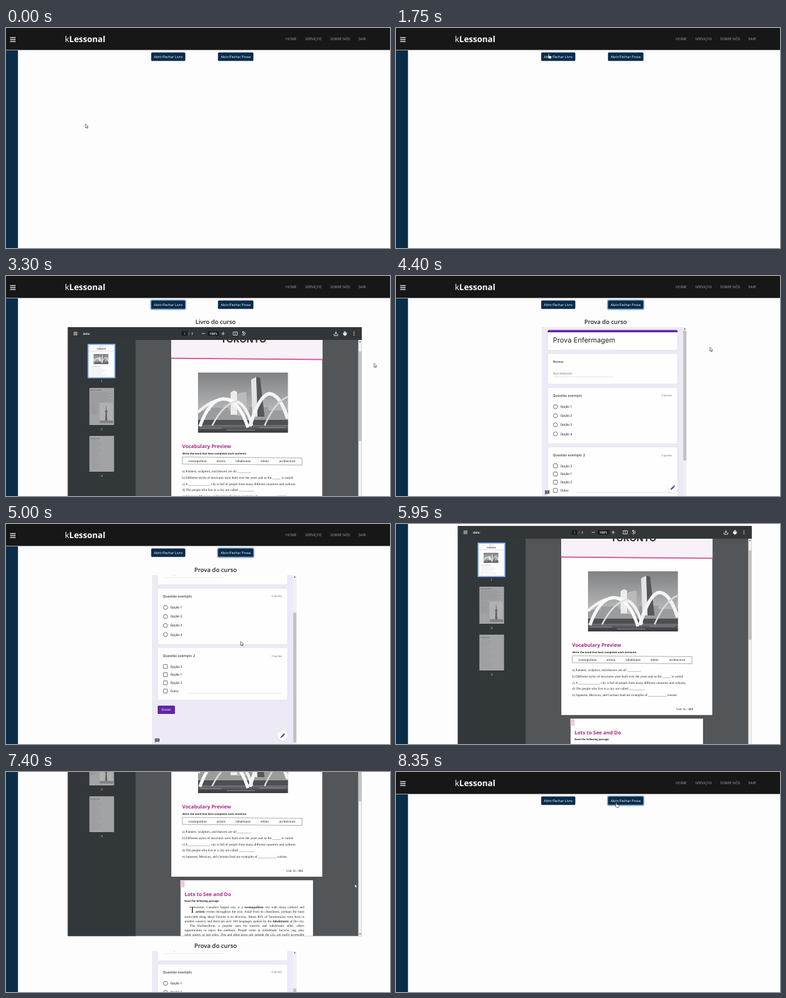
An HTML page that plays this animation: 600 by 344 pixels, repeating every 8400 ms.

```html
<!DOCTYPE html>
<html lang="pt">
<head>
<meta charset="utf-8">
<title>kLessonal</title>
<style>
html, body { margin: 0; width: 100%; height: 100%; overflow: hidden; background: #fdfdfd; }
svg { display: block; }
text { font-family: "Open Sans", "Noto Sans", sans-serif; text-rendering: geometricPrecision; white-space: pre; }
.serif { font-family: "Liberation Serif", "Noto Serif", serif; }
.inter { font-family: Inter, sans-serif; }
.robo { font-family: Roboto, sans-serif; }
</style>
</head>
<body>
<svg id="stage" width="600" height="344" viewBox="0 0 600 344" xmlns="http://www.w3.org/2000/svg"></svg>
<script>
const LOOP = 8400, STEP = 50;
const DARK = '#171717', NAVY = '#0b2c49', PINK = '#a92a80', INK = '#1f1f1f';

const rect = (x, y, w, h, fill, more = '') =>
  `<rect x="${x}" y="${y}" width="${w}" height="${h}" fill="${fill}" ${more}/>`;
const text = (x, y, size, str, fill, more = '') =>
  `<text x="${x}" y="${y}" font-size="${size}" fill="${fill}" ${more}>${str}</text>`;
const path = (d, stroke, width, fill = 'none') =>
  `<path d="${d}" stroke="${stroke}" stroke-width="${width}" fill="${fill}"/>`;
const shape = (d, fill) => `<path d="${d}" fill="${fill}"/>`;
const disc = (x, y, r, fill, more = '') =>
  `<circle cx="${x}" cy="${y}" r="${r}" fill="${fill}" ${more}/>`;
const BOLD = 'font-weight="700"', SEMI = 'font-weight="600"', MID = 'text-anchor="middle"';
const SERIF = 'class="serif"', INTER = 'class="inter"', ROBO = 'class="robo"';
const SHADOW = 'stroke="#000" stroke-opacity=".28" stroke-width="1.2"';

function header() {
  const nav = [[437, 'HOME'], [467.5, 'SERVIÇOS'], [506.5, 'SOBRE NÓS'], [550.5, 'SAIR']];
  return rect(0, 0, 600, 34.4, DARK) +
    path('M6.5 15.2h8.5M6.5 18.2h8.5M6.5 21.2h8.5', '#fff', 1.3) +
    text(92, 22, 13, 'k<tspan font-weight="700">Lessonal</tspan>', '#fff') +
    nav.map(([x, s]) => text(x, 18.8, 5.7, s, '#a3a3a3')).join('');
}

function button(id, x, w, label) {
  return rect(x - .8, 37.4, w + 1.6, 15.2, 'none', `id="${id}" rx="2" stroke="#86b4e0" stroke-width="1.4"`) +
    rect(x, 38.2, w, 13.4, '#0a2b4b', 'rx="1.5"') +
    text(x + w / 2, 46.9, 5.4, label, '#fff', MID);
}

function photo() {
  return rect(300, 74, 140.5, 94, 'url(#sky)') +
    shape('M300 134h20v-5h28v4h32v-5h30v5h30.5v25H300z', '#9a9c9d') +
    shape('M351 105l5-3 5 2v36h-10z', '#ececec') +
    shape('M361 108q9-5 15-3v36h-15z', '#b9babb') +
    shape('M383 85l8-4 3 62h-9z', '#e4e4e4') +
    shape('M391 81l6 1 7 61h-11z', '#55575a') +
    rect(300, 148, 140.5, 8, '#4d5052') +
    rect(300, 156, 140.5, 12, 'url(#water)') +
    path('M303 161h34M345 164h44M396 160h40', '#8f9193', 1) +
    path('M300 136Q334 104 366 122Q378 132 384 157', '#f1f1f1', 4.5) +
    path('M303 158Q318 116 340 115Q364 116 378 160', '#fafafa', 5) +
    path('M322 157Q340 122 362 118', '#dedede', 2.5) +
    path('M381 158Q396 108 412 107Q428 108 440 146', '#f4f4f4', 5.5) +
    path('M404 157Q420 120 440 112', '#d9d9d9', 2.5);
}

function pageOne() {
  const words = [[285, 'cosmopolitan'], [329, 'artistic'], [359, 'inhabitants'], [398, 'ethnic'], [427, 'architecture']];
  const blank = n => '_'.repeat(n);
  const lines = [
    `a) Painters, sculptors, and dancers are all ${blank(8)}.`,
    `b) Different styles of structures were built over the years and so the ${blank(5)} is varied.`,
    `c) A ${blank(13)} city is full of people from many different countries and cultures.`,
    `d) The people who live in a city are called ${blank(9)}.`,
    `e) Japanese, Mexican, and German food are examples of ${blank(11)} cuisine.`];
  return rect(258, -8, 236.5, 307, '#fefefe', SHADOW) +
    shape('M258-8H494.5V53L258 51.5z', '#f8f1f8') +
    text(371, 8, 5, 'UNIT 16', PINK, MID + ' ' + BOLD) +
    text(371, 26.8, 14.3, 'TORONTO', '#2c2c2c', `class="inter" ${MID} ${BOLD}`) +
    path('M258 51.7L494.5 53.7', '#cf4f97', 1.7) +
    photo() +
    text(275.3, 192, 7.8, 'Vocabulary Preview', PINK, BOLD) +
    text(275.5, 202, 3.98, 'Write the word that best completes each sentence.', INK, BOLD) +
    path('M275.5 206L462.5 207.5V218.5L275.5 217z', '#777', .6) +
    words.map(([x, s]) => text(x, 213.6, 5.3, s, INK, SERIF)).join('') +
    lines.map((s, i) => text(275.3, 230 + i * 9.75, 5.2, s, INK, SERIF)).join('') +
    text(438, 291, 4.9, 'Unit 16 / <tspan font-weight="700">153</tspan>', INK, SERIF);
}

function pageTwo() {
  const b = s => `<tspan font-weight="700">${s}</tspan>`;
  const lines = [
    [296, `oronto, Canada’s largest city, is a ${b('cosmopolitan')} city with many cultural and`],
    [296, `${b('artistic')} events throughout the year. Aside from its cleanliness, perhaps the most`],
    [279, 'noticeable thing about Toronto is its diversity. About 40% of Torontonians were born in'],
    [279, `another country, and there are over 100 languages spoken by the ${b('inhabitants')} of the city.`],
    [287, 'The Harbourfront, a popular area for tourists and inhabitants alike, offers'],
    [279, 'opportunities to enjoy the outdoors. People come to rollerblade, bicycle, jog, play'],
    [279, 'other sports, or just relax. This and other areas just outside the city, are easily accessible']];
  return rect(272.5, 304, 207.5, 268, '#fefefe', SHADOW) +
    rect(272.5, 304, 6.5, 11.5, '#f2c8de') +
    text(279, 328.6, 7.9, 'Lots to See and Do', PINK, BOLD) +
    text(279, 338, 3.95, 'Read the following passage.', INK, BOLD) +
    text(287, 354.5, 14, 'T', INK, SERIF) +
    lines.map(([x, s], i) => text(x, 348.2 + i * 7.2, 5.2, s, INK, `class="serif" data-end="466"`)).join('');
}

function thumbs() {
  const rows = (x, y, w, n, gap) => Array.from({ length: n }, (_, i) =>
    `M${x} ${y + i * gap}h${w * (.72 + .28 * Math.sin(i * 2.3) ** 2)}`).join('');
  const label = (y, n) => text(149.5, y, 4.6, n, '#f1f1f1', MID);
  return rect(128.4, 30, 41.6, 52, '#fefefe', 'stroke="#8ab4f8" stroke-width="1.8"') +
    text(149, 34, 2, 'UNIT 16', PINK, MID) +
    text(149, 37.6, 2.9, 'TORONTO', '#333', MID + ' ' + BOLD) +
    path('M129.5 40.3h39.5', '#e5a3c6', .5) +
    `<g transform="translate(136.8 45) scale(.165) translate(-300 -74)">${photo()}</g>` +
    text(133, 65, 1.6, 'Vocabulary Preview', '#b86a9d', BOLD) +
    path(rows(133, 67, 24, 7, 1.9), '#cfcfcf', .4) + label(88.8, 1) +
    rect(130.3, 98, 38.5, 58, '#a2a3a4') +
    text(132, 102.3, 1.9, 'Lots to See and Do', '#6b3459', BOLD) +
    path(rows(132, 104.5, 35, 12, 1.35), '#8e8f90', .5) +
    path(rows(132, 121.5, 13, 14, 1.35), '#8e8f90', .5) +
    rect(146.5, 121.5, 20.5, 31.5, '#b0b1b2') +
    shape('M156.6 124l1 12 .8 13h-3.6l.8-13z', '#606365') +
    rect(154.4, 134, 4.4, 1.8, '#606365') + rect(146.5, 149, 20.5, 4, '#7f8183') + label(163.8, 2) +
    rect(130.3, 173, 38.5, 56, '#a2a3a4') +
    text(132, 177.5, 2, 'Reading Check', '#555', BOLD) +
    path(rows(133, 180, 17, 16, 2.9), '#8a8b8d', .45) + label(236.8, 3);
}

function toolbar() {
  const w = '#f1f1f1';
  return rect(96, 3, 460, 20, '#323639') +
    path('M105.5 11h6M105.5 13h6M105.5 15h6', w, .9) +
    text(120.3, 14.8, 4.7, 'data:', w, `class="inter" ${BOLD}`) +
    rect(274.5, 9.5, 8.5, 7, '#191b1c') + text(279, 14.9, 5, '1', w, `class="robo" ${MID}`) +
    text(285, 14.9, 5, '/  3', w, ROBO) +
    path('M305.8 13h5M336.8 13h5M339.3 10.5v5', w, .8) +
    rect(315.5, 9.5, 17, 7, '#191b1c') + text(324, 14.9, 5, '100%', w, `class="robo" ${MID} ${SEMI}`) +
    path('M355 10.5h6.5v5H355zM358.2 11.5v3', w, .8) +
    path('M369.6 10.8a2.7 2.7 0 1 1-.9 3.4M371 9.2l-2 1.7 2 1.6M371 12l1.3 1-1.3 1z', w, .8) +
    path('M515.5 9.5v4M513.7 12l1.8 1.8L517.3 12M512.6 13.5v2.6h5.8v-2.6', w, .9) +
    rect(526.8, 11.6, 5.6, 3.4, w) + rect(528, 9.8, 3.2, 1.3, w) + rect(528, 14, 3.2, 2.3, w) +
    [10.6, 13, 15.4].map(y => disc(543.7, y, .75, w)).join('');
}

const arrow = (x, y, dir) => shape(`M${x - 1.5} ${y + dir}h3l-1.5 ${-2 * dir}z`, '#555');

function book() {
  return text(327.5, -1.6, 9.3, 'Livro do curso', '#222', `${MID} ${SEMI}`) +
    `<svg x="96.6" y="3" width="459.2" height="388.5" viewBox="96.6 3 459.2 388.5">` +
    rect(96, 3, 460, 389, '#525659') +
    `<g id="doc">${pageOne()}${pageTwo()}</g>` +
    rect(96, 23, 106.5, 369, '#32373a') + thumbs() +
    rect(550.5, 23, 5.5, 369, '#f1f1f1') + arrow(553.2, 25.5, 1) + arrow(553.2, 388.5, -1) +
    rect(550.8, 28, 4.9, 140, '#c1c1c1', 'id="docThumb"') + toolbar() + '</svg>';
}

function form() {
  const ink = '#202124', grey = '#777b80';
  const card = (y, h) => rect(237, y, 203, h, '#fefefe', 'rx="2" stroke="#dcd8e6" stroke-width=".6"');
  const question = (y, s) => text(245.3, y + 2, 5.5, s, ink, INTER) +
    text(431.5, y + 1.5, 4.15, '0 pontos', grey, 'class="robo" text-anchor="end"');
  const option = (y, s, box) => (box
    ? rect(246, y - 3.1, 6.2, 6.2, 'none', 'rx=".7" stroke="#5f6368" stroke-width=".9"')
    : disc(249.2, y, 3.2, 'none', 'stroke="#5f6368" stroke-width=".9"')) +
    text(256.7, y + 1.7, 5, s, ink, ROBO);
  return text(327.5, 75.4, 9.3, 'Prova do curso', '#222', `${MID} ${SEMI}`) +
    `<svg x="228" y="80" width="226" height="268" viewBox="228 80 226 268">` +
    rect(228, 80, 226, 268, '#ede9f5') + '<g id="sheet">' +
    card(84.5, 31.5) + shape('M237 88v-1.5q0-2 2-2h199q2 0 2 2V88z', '#6025a8') +
    text(245.3, 104, 10.8, 'Prova Enfermagem', ink, INTER) +
    card(121.3, 47.7) + text(245.3, 135.7, 5.6, 'Nome:', ink, INTER) +
    text(245.3, 154.4, 5.1, 'Sua resposta', grey, ROBO) + path('M245.5 157.7h94', '#d5d5d5', .6) +
    card(174.2, 88.2) + question(186.7, 'Questão exemplo') +
    [1, 2, 3, 4].map((n, i) => option(204.4 + i * 14.15, 'Opção ' + n)).join('') +
    card(267.3, 82) + question(280, 'Questão exemplo 2') +
    ['Opção 3', 'Opção 1', 'Opção 2', 'Outro:'].map((s, i) => option(296.8 + i * 12.8, s, true)).join('') +
    path('M282 338.6h149', '#d5d5d5', .6) +
    rect(237, 358, 27, 13, '#6025a8', 'rx="1.5"') + text(250.5, 366.4, 5, 'Enviar', '#fff', `class="inter" ${MID}`) +
    '</g>' +
    shape('M232.8 335.2h7v5.2h-5.2l-1.8 1.8z', '#55585c') + path('M236.3 336v2M236.3 338.7v.8', '#fff', .8) +
    disc(432, 331.8, 8.4, '#d9d5e3') + disc(432, 331.2, 8, '#fff') +
    path('M429.4 334l.4-1.6 3.6-3.6 1.2 1.2-3.6 3.6zM433.9 328.3l.7-.7 1.2 1.2-.7.7z', '#3f45a8', .7, '#3f45a8') +
    rect(448.5, 80, 5.5, 268, '#f1f1f1') + arrow(451.2, 82.6, 1) + arrow(451.2, 345, -1) +
    rect(448.8, 85.5, 4.9, 203, '#c1c1c1', 'id="formThumb"') + '</svg>';
}

function footer() {
  const list = (x, title, items) => text(x, 30.4, 6.6, title, '#fff', SEMI) +
    items.map((s, i) => text(x, 42.2 + i * 7.9, 5.2, '• ' + s, '#fff', 'font-weight="500"')).join('');
  const social = ['#3b5998', '#d23a78', '#c4191f', '#3a9fe6'];
  return rect(0, 0, 600, 100, DARK) +
    list(76.5, 'Empresa', ['Sobre nós', 'Legal', 'Notícias']) +
    list(169.5, 'Ajuda', ['Central de ajuda', 'Cursos', 'Contato']) +
    text(471, 30.4, 6.5, 'Mídias sociais', '#fff', `${MID} ${SEMI}`) +
    social.map((c, i) => disc(421 + i * 35.8, 50, 12, '#fff') + disc(421 + i * 35.8, 50, 8, c)).join('');
}

const fade = (id, a, b) => `<linearGradient id="${id}" x2="0" y2="1"><stop stop-color="${a}"/><stop offset=".7" stop-color="${b}"/></linearGradient>`;
const stage = document.getElementById('stage');
stage.innerHTML = `<defs>${fade('sky', '#7f8183', '#bcbdbe')}${fade('water', '#74767a', '#3f4144')}</defs>` +
  rect(0, 0, 600, 344, '#fdfdfd') +
  `<g id="page">${rect(0, 35, 18.7, 800, NAVY, 'id="side"')}${header()}
  ${button('ringBook', 226.8, 53.4, 'Abrir/Fechar Livro')}${button('ringTest', 331.2, 55.4, 'Abrir/Fechar Prova')}
  <g id="book">${book()}</g><g id="form">${form()}</g><g id="foot">${footer()}</g></g>
  <g id="arrow">${path('M0 0v6.2l1.5-1.3 1 2.2 1-.5-1-2.1h2z', '#222', .6, '#fff')}</g>
  <g id="hand">${path('M0 .6q.7-.9 1.3 0v2.6l2.9.7q.8.3.7 1.2l-.5 2.9H.9L-1.2 5q.1-1 1.2-.3z', '#222', .6, '#fff')}</g>`;

const $ = id => document.getElementById(id);
const show = (id, on) => $(id).setAttribute('visibility', on ? 'visible' : 'hidden');
const move = (id, x, y) => $(id).setAttribute('transform', `translate(${x} ${y})`);

// Spread the words of passage lines to the right margin.
function justify() {
  document.querySelectorAll('[data-end]').forEach(el => {
    const gaps = el.textContent.split(' ').length - 1;
    const spare = el.dataset.end - el.getAttribute('x') - el.getComputedTextLength();
    el.style.wordSpacing = spare / gaps + 'px';
  });
}

// Each key is [time, ...values].
const POINTER = [[0, 124, 150], [950, 124, 150], [1450, 238, 40], [1850, 238, 40], [2050, 400, 160], [2200, 410, 165],
  [2400, 575, 136.5], [3300, 575, 136.5], [3550, 252, 43], [3700, 252, 43], [3900, 358, 43], [4100, 358, 43],
  [4350, 490.5, 111.5], [4500, 490.5, 111.5], [4650, 380, 200], [4950, 380, 200], [5200, 252, 43], [5350, 252, 43],
  [5600, 612, 90], [7100, 612, 150], [7350, 545, 175], [7550, 545, 175], [7850, 254, 43], [8000, 254, 43],
  [8200, 343.5, 47.5], [LOOP, 343.5, 47.5]];
const SCROLL = [[0, 0], [2400, 0], [2750, 181], [2950, 181], [3300, 0], [5600, 0], [5900, 77], [6000, 77],
  [6400, 420], [6750, 420], [7100, 212], [7500, 212], [7750, 0], [LOOP, 0]];
const DOC = [[0, 0], [2050, 0], [2250, 35], [LOOP, 35]];
const SHEET = [[0, 0], [4650, 0], [4950, 74], [LOOP, 74]];

function at(keys, t) {
  const i = Math.max(1, keys.findIndex(k => k[0] > t));
  const a = keys[i - 1], b = keys[i];
  const u = (t - a[0]) / (b[0] - a[0]), e = u * u * (3 - 2 * u);
  return a.slice(1).map((v, j) => v + (b[j + 1] - v) * e);
}
const within = (t, ...spans) => spans.some(([a, b]) => t >= a && t < b);

function draw(t) {
  const [scroll] = at(SCROLL, t), [doc] = at(DOC, t), [sheet] = at(SHEET, t), [x, y] = at(POINTER, t);
  const bookOpen = within(t, [1850, 3650], [5300, 7950]);
  const formOpen = within(t, [4050, 8250]);
  const shift = bookOpen ? 412 : 0;
  const end = formOpen ? 350 + shift : bookOpen ? 470 : 350;
  move('page', 0, -scroll);
  move('book', 0, 77);
  move('form', 0, shift);
  move('foot', 0, end);
  $('side').setAttribute('height', end - 35);
  show('book', bookOpen);
  show('form', formOpen);
  show('ringBook', within(t, [1850, 4000], [5300, 8200]));
  show('ringTest', within(t, [4000, 5300], [8200, LOOP]));
  move('doc', 0, 35 - doc);
  move('docThumb', 0, doc * 13 / 35);
  move('sheet', 0, -sheet);
  move('formThumb', 0, sheet * 53 / 74);
  const py = y + scroll;
  const over = py > 38 && py < 52 && (x > 227 && x < 280 || x > 331 && x < 387);
  show('arrow', !over);
  show('hand', over);
  move(over ? 'hand' : 'arrow', x, y);
}

function tick(now) {
  draw(Math.floor(now % LOOP / STEP) * STEP);
  requestAnimationFrame(tick);
}
justify();
draw(0);
requestAnimationFrame(tick);
</script>
</body>
</html>
```
